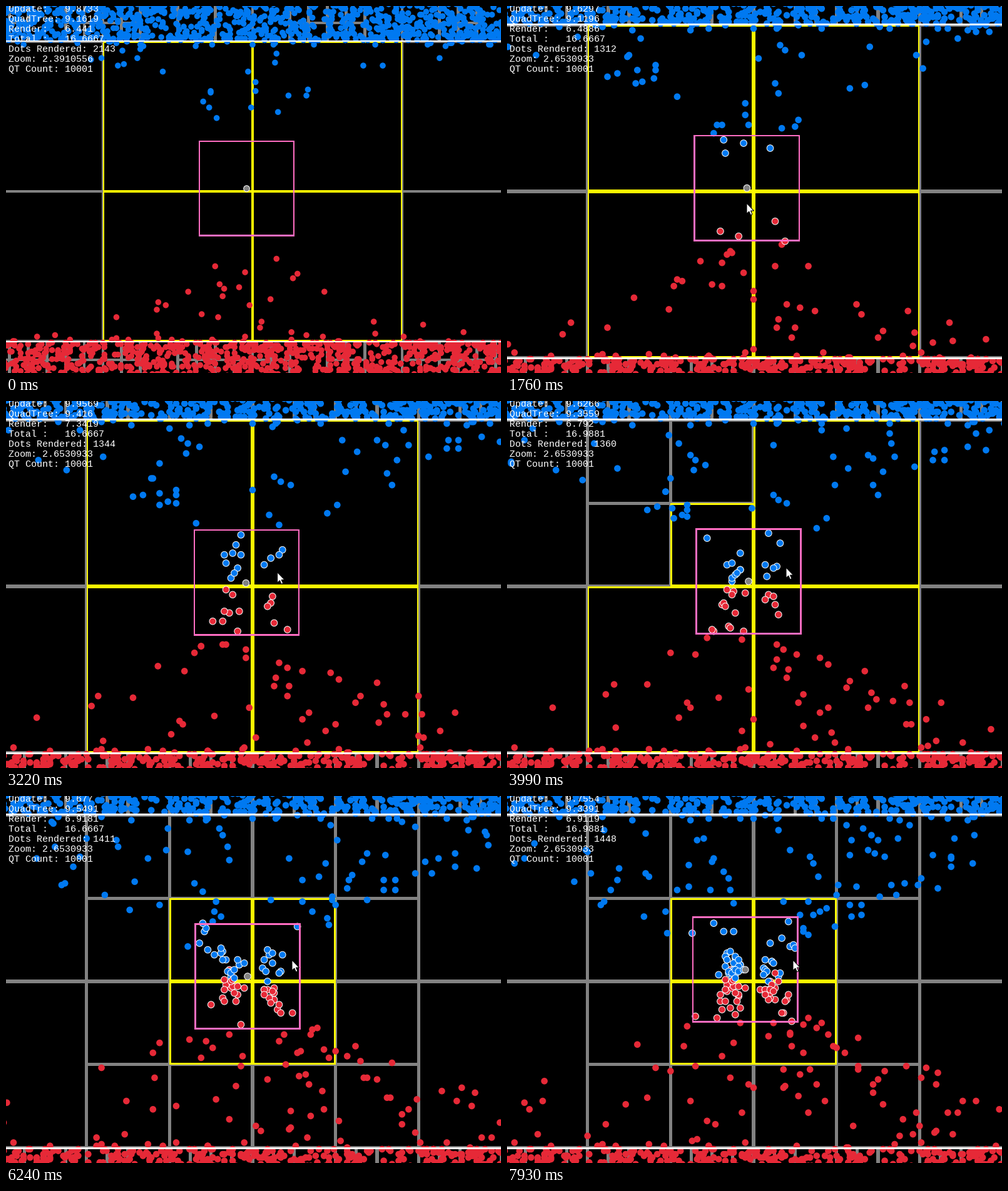
A matplotlib script that plays this animation: 791x586 px, repeating every 8 s.

```python
import numpy as np
import matplotlib.pyplot as plt
from matplotlib.animation import FuncAnimation
from matplotlib.collections import PolyCollection
from matplotlib.patches import Circle, Polygon

W, H, DPI = 791, 586, 100
FRAMES, STEP = 100, 80
CX, CY = 394, 296                 # screen position of the world origin
SPEED = 15.4                      # world units per second
BLUE, RED, GRAY = "#0079f1", "#e62937", "#828282"
YELLOW, PINK = "#fdf900", "#ff6dc2"
PX = 72 / DPI                     # points per pixel

rng = np.random.default_rng(12)


def make_army(side, n_move=140, n_band=790, n_fringe=16):
    """Starts, goals and leaving times of one colour; resting dots never leave."""
    n_rest = n_band + n_fringe
    rest_x = rng.uniform(-172, 172, n_rest)
    rest_y = np.append(rng.uniform(101, 126, n_band),
                       rng.uniform(97, 100, n_fringe))

    # The stream starts thin and central, then grows and widens.
    age = 11.9 * ((np.arange(n_move) + rng.random(n_move)) / n_move) ** 0.77
    move_x = rng.uniform(-1, 1, n_move) * np.minimum(210, 35 + 45 * age)
    move_y = rng.uniform(100, 106, n_move)

    x = np.append(rest_x, move_x)
    y = side * np.append(rest_y, move_y)
    leave = np.append(np.full(n_rest, 99.0), age - 3.9)
    # Dots gather in two loose columns beside the player.
    goal = np.column_stack([np.where(x < 10, -12, 10), 0 * x + 4.5 * side - 2])
    goal = goal + rng.normal(0, (3.5, 5.5), goal.shape)
    return np.column_stack([x, y]), goal, leave


blue, red = make_army(-1), make_army(1)
START, GOAL, LEAVE = (np.concatenate(pair) for pair in zip(blue, red))
COLORS = np.array([BLUE] * len(blue[0]) + [RED] * len(red[0]) + [GRAY])
ORDER = np.append(rng.permutation(len(START)), len(START))
DIST = np.hypot(*(START - GOAL).T)
AIM = (START - GOAL) / DIST[:, None]
HALT = rng.uniform(0, 1.2 * np.minimum(LEAVE + DIST / SPEED, 12))


def dots_at(t):
    r = np.maximum(DIST - SPEED * np.maximum(t - LEAVE, 0), HALT)
    return np.rint(GOAL + AIM * r[:, None])


def quarters(x, y, s):
    h = s / 2
    return [(x, y, h), (x + h, y, h), (x, y + h, h), (x + h, y + h, h)]


# Quadtree leaves (x, y, size) that never change.
FIXED = [(x, y, 100) for x in (-200, 100) for y in (-100, 0)]
for bx in range(-175, 175, 25):
    for by in (-125, 100):
        FIXED += quarters(bx, by, 25) if rng.random() < 0.5 else [(bx, by, 25)]

# Inner quadrants and the frame at which each one splits.
INNER = [(-100, -100, 41), (-100, 0, 56), (0, -100, 67), (0, 0, 71)]


def leaves_at(i):
    out = list(FIXED)
    for x, y, split in INNER:
        out += quarters(x, y, 100) if i >= split else [(x, y, 100)]
    return out


def rect(x0, y0, x1, y1):
    return np.array([(x0, y0), (x1, y0), (x1, y1), (x0, y1)])


def ring(x0, y0, x1, y1, w=1):
    return [rect(x0, y0, x1, y0 + w), rect(x0, y1 - w, x1, y1),
            rect(x0, y0, x0 + w, y1), rect(x1 - w, y0, x1, y1)]


def readout(i, zoom):
    r = np.random.default_rng(i)
    rows = {"Update:": r.uniform(9.3, 10.2), "QuadTree:": r.uniform(9, 9.6),
            "Render:": r.uniform(6.4, 7.4),
            "Total :": r.choice([16.6667, 16.9881])}
    lines = [f"{name:<10}" + f"{v:.4f}".rstrip("0") for name, v in rows.items()]
    seen = np.interp(i, [0, 4, 10, 99], [2143, 2143, 1291, 1448])
    return lines + [f"Dots Rendered: {seen:.0f}", f"Zoom: {zoom:.7f}",
                    "QT Count: 10001"]


def glide(i, keys, *tracks):
    return np.array([np.interp(i, keys, track) for track in tracks])


fig = plt.figure(figsize=(W / DPI, H / DPI), dpi=DPI, facecolor="black")
ax = fig.add_axes([0, 0, 1, 1])
ax.set_xlim(0, W)
ax.set_ylim(H, 0)
ax.axis("off")


def poly_layer(z, color="none"):
    layer = PolyCollection([], facecolors=color, edgecolors="none",
                           antialiaseds=False, zorder=z)
    ax.add_collection(layer, autolim=False)
    return layer


tree = poly_layer(1)
walls = poly_layer(4, "white")
box = poly_layer(5, PINK)
dots = ax.scatter([], [], linewidths=0, zorder=2)
near = ax.scatter([], [], edgecolors="white", linewidths=PX, zorder=3)

click = Circle((0, 0), 12, color=YELLOW, alpha=0.5, lw=0, zorder=6)
ax.add_patch(click)
ARROW = np.array([(0, 0), (0, 16.5), (3.8, 13), (6.4, 18.8), (9, 17.7),
                  (6.5, 12), (11.5, 12)])
arrow = Polygon(ARROW, fc="white", ec="black", lw=PX, zorder=7)
ax.add_patch(arrow)
labels = [ax.text(4, 8.7 + 16 * k, "", color="white", family="Liberation Mono",
                  size=15 * PX, va="baseline", zorder=8) for k in range(7)]


def update(i):
    zoom = np.interp(i, [4, 10], [2.3910556, 2.6530933])
    player = glide(i, [36, 46, 80, 99], [-4, -3, -3, -5], [-2, -3, -3, -7.2])

    def screen(p):
        return np.asarray(p) * zoom + (CX, CY)

    x0, y0 = player - 32
    x1, y1 = player + 32

    polys, fills = [], []
    for x, y, s in leaves_at(i):
        hit = x < x1 and x + s > x0 and y < y1 and y + s > y0
        polys += [screen(rect(x, y, x + s, y + s)),
                  screen(rect(x + 1, y + 1, x + s - 1, y + s - 1))]
        fills += [YELLOW if hit else GRAY, "black"]
    tree.set_verts(polys)
    tree.set_facecolor(fills)
    walls.set_verts([screen(rect(-200, y, 200, y + 1)) for y in (-101, 100)])
    box.set_verts([screen(q) for q in ring(x0, y0, x1, y1)])

    pos = np.vstack([dots_at(i * STEP / 1000), np.rint(player)])[ORDER]
    colors = COLORS[ORDER]
    inside = (np.abs(pos - player) <= 32).all(axis=1)
    for layer, mask in ((dots, ~inside), (near, inside)):
        layer.set_offsets(screen(pos[mask]))
        layer.set_sizes([(4 * zoom * PX) ** 2])
        layer.set_facecolor(colors[mask])

    tip = glide(i, [22, 30, 49, 62], [383, 420, 446, 457], [315, 282, 266, 262])
    arrow.set_xy(ARROW + tip)
    arrow.set_visible(i >= 12)
    click.center = tuple(tip - 1)
    click.set_visible(28 <= i <= 33)
    for label, line in zip(labels, readout(i, zoom)):
        label.set_text(line)
    return []


anim = FuncAnimation(fig, update, frames=FRAMES, interval=STEP, repeat=True,
                     repeat_delay=0, blit=False)
plt.show()
```
